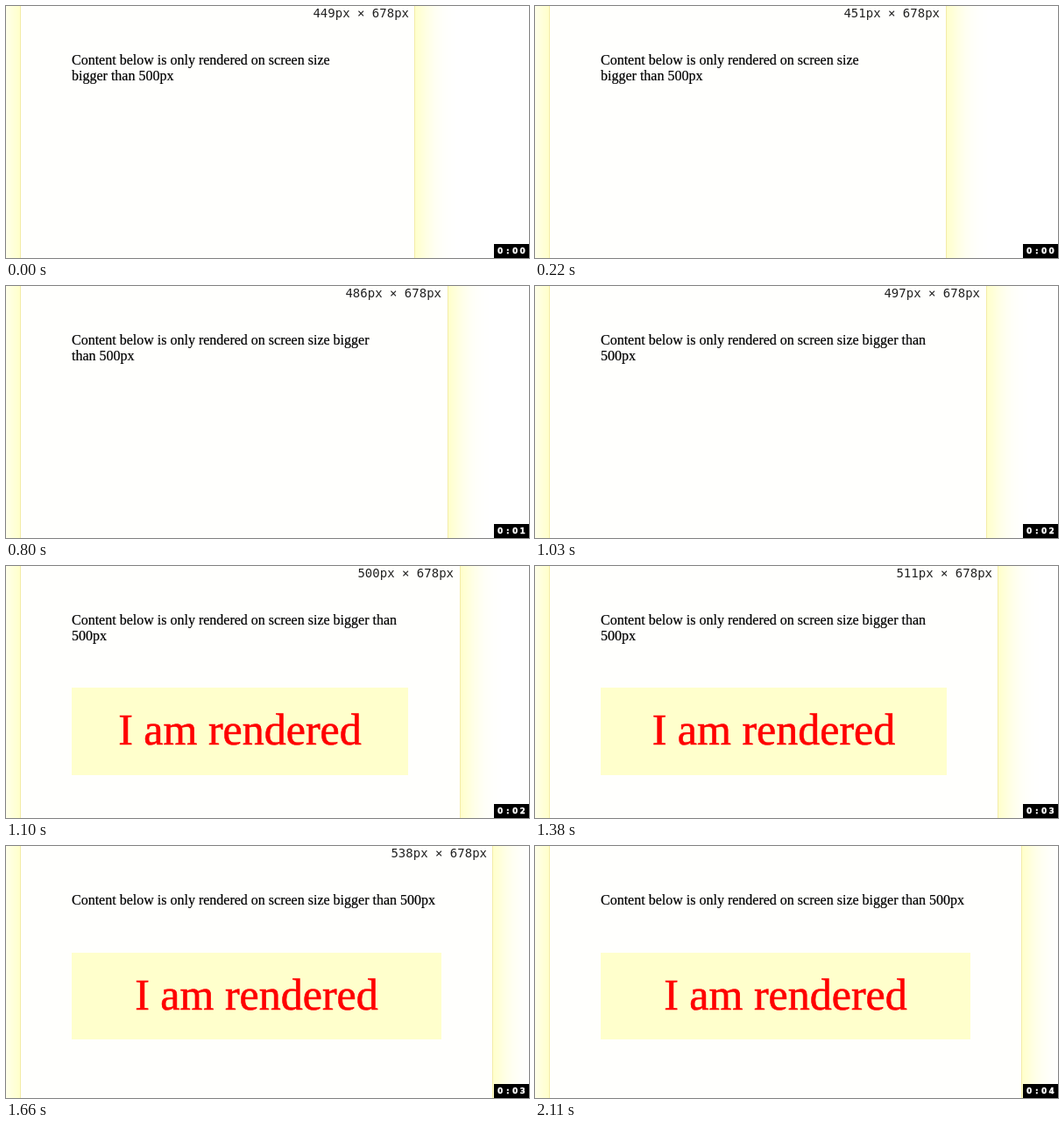
Animation of 597x288 px, one loop 2180 ms. Source, as an HTML page:

```html
<!DOCTYPE html>
<html lang="en">
<head>
<meta charset="utf-8">
<title>Responsive rendering</title>
<style>
  html, body { margin: 0; width: 100%; height: 100%; overflow: hidden; background: #fff; }
  #stage { position: relative; width: 597px; height: 288px; overflow: hidden; }
  #stage > * { position: absolute; box-sizing: border-box; }
  #pane {
    left: 16px; top: -60px; height: 678px;
    background: #fffffd; border: 1px solid #f3eca8;
    box-shadow: 0 0 38px #ffff96;
  }
  #size {
    top: 0; white-space: pre; color: #222;
    font: 14px/16px "DejaVu Sans Mono", monospace;
  }
  #content { left: 75px; top: 53px; font-family: "Liberation Serif", serif; color: #000; }
  #content p {
    margin: 0 0 51.25px; font-size: 16px; line-height: 17.5px;
    -webkit-text-stroke: 0.2px;
  }
  #card {
    height: 99.5px; background: #ffffcc; color: #f00;
    font-size: 50px; line-height: 97px; text-align: center; white-space: nowrap;
    -webkit-text-stroke: 0.6px;
  }
  #clock {
    left: 557px; top: 272px; width: 40px; height: 16px; padding: 0 3px;
    display: flex; background: #000; color: #fff;
    font: bold 9px/16px "DejaVu Sans", sans-serif; -webkit-text-stroke: 0.3px;
  }
  #clock span { flex: 1 0 0; text-align: center; }
</style>
</head>
<body>
<div id="stage">
  <div id="pane"></div>
  <div id="size"></div>
  <div id="content">
    <p>Content below is only rendered on screen size bigger than 500px</p>
    <div id="card">I am rendered</div>
  </div>
  <div id="clock"><span>0</span><span>:</span><span>0</span><span id="sec">0</span></div>
</div>
<script>
const LOOP = 2180, BEAT = 70;
const DRAG_START = 150, DRAG_SLOWS = 1310, FADE_START = 1880;
const BREAKPOINT = 500;

const ticks = [380, 890, 1310, 1970];
// Each of these moments restarts the refresh rhythm
const anchors = [0, DRAG_START, ...ticks, FADE_START].sort((a, b) => a - b);
// Dragged width: [time, px]
const drag = [[180, 449], [800, 486], [1100, 500], [1380, 511], [1660, 538]];

const el = id => document.getElementById(id);
const pane = el("pane"), size = el("size"), content = el("content");
const card = el("card"), sec = el("sec");
const clamp = x => Math.min(1, Math.max(0, x));

// Sum of the straight stretches travelled so far
function widthAt(time) {
  return Math.round(drag.slice(1).reduce((w, [t, px], i) => {
    const [t0, px0] = drag[i];
    return w + (px - px0) * clamp((time - t0) / (t - t0));
  }, drag[0][1]));
}

function refreshTime(now) {
  const anchor = anchors.filter(t => t <= now).pop();
  return anchor + Math.floor((now - anchor) / BEAT) * BEAT;
}

function draw(time) {
  const width = widthAt(time);
  // The edge runs a pixel ahead of the layout early in the drag
  const lead = time >= DRAG_START && time < DRAG_SLOWS ? 1 : 0;
  pane.style.width = width + lead + 2 + "px";
  size.textContent = width + "px × 678px";
  size.style.right = 597 - (width + 11) + "px";
  size.style.opacity = time < FADE_START ? 1 : clamp((LOOP - BEAT - time) / 300);
  content.style.width = width - 116 + "px";
  card.style.display = width >= BREAKPOINT ? "block" : "none";
  sec.textContent = ticks.filter(t => t <= time).length;
}

const start = performance.now();
function loop() {
  draw(refreshTime((performance.now() - start) % LOOP));
  requestAnimationFrame(loop);
}
loop();
</script>
</body>
</html>
```
